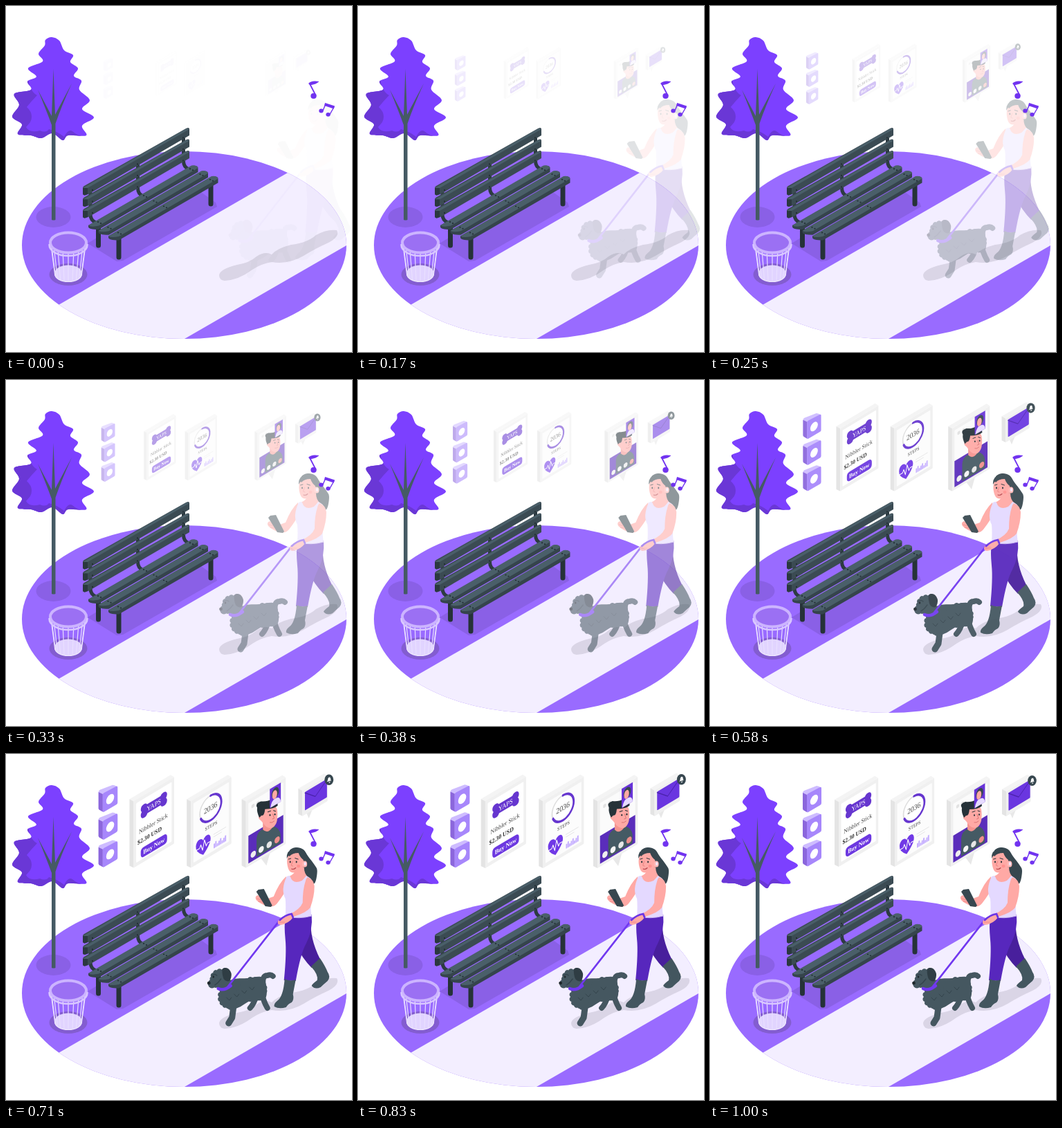
An HTML page that plays this animation: 500 px wide and 500 px high, repeating every 1.04 s.

```html
<!DOCTYPE html>
<html lang="en">
<head>
<meta charset="utf-8">
<title>Walking the dog</title>
<style>
html, body { margin: 0; width: 100%; height: 100%; overflow: hidden; background: #fff; }
svg { display: block; width: 100%; height: 100%; }
text { font-family: "Liberation Serif", "Noto Serif", serif; }
</style>
</head>
<body>
<svg id="stage" viewBox="0 0 500 500"></svg>
<script>
const stage = document.getElementById('stage');
const SKIN = '#ffa9a5', DARK = '#37474f', SLATE = '#455a64', INK = '#263238';
const VIOLET = '#7c40ff', DEEP = '#6636cf', LEASH = '#7138f0', SHADE = '#8a60e6';
const ISO = 0.577;

function add(parent, tag, attrs, text) {
  const el = document.createElementNS('http://www.w3.org/2000/svg', tag);
  for (const k in attrs) el.setAttribute(k, attrs[k]);
  if (text) el.textContent = text;
  return parent.appendChild(el);
}
const group = (parent, attrs) => add(parent, 'g', attrs);
const poly = (g, points, fill) => add(g, 'polygon', { points, fill });
const path = (g, d, fill) => add(g, 'path', { d, fill });
const line = (g, d, stroke, width) => add(g, 'path', {
  d, stroke, fill: 'none', 'stroke-width': width, 'stroke-linecap': 'round', 'stroke-linejoin': 'round' });
const oval = (g, cx, cy, rx, ry, fill) => add(g, 'ellipse', { cx, cy, rx, ry, fill });
const box = (g, x, y, width, height, rx, fill) => add(g, 'rect', { x, y, width, height, rx, fill });
const label = (g, x, y, size, fill, str, weight = 400) => add(g, 'text', {
  x, y, fill, 'font-size': size, 'font-weight': weight, 'text-anchor': 'middle' }, str);
const clipTo = (parent, id) => add(parent, 'clipPath', { id });

// Closed smooth curve through the given points
function blob(g, str, fill) {
  const p = str.split(' ').map(s => s.split(',').map(Number)), n = p.length;
  let d = 'M' + p[0];
  for (let i = 0; i < n; i++) {
    const a = p[(i + n - 1) % n], b = p[i], c = p[(i + 1) % n], e = p[(i + 2) % n];
    const ctrl = (u, v, w, s) => [0, 1].map(k => u[k] + s * (w[k] - v[k]) / 6);
    d += 'C' + ctrl(b, a, c, 1) + ' ' + ctrl(c, b, e, -1) + ' ' + c;
  }
  return path(g, d + 'Z', fill);
}

// Oval with a scalloped rim
function fur(g, cx, cy, rx, ry, tufts, fill) {
  const r = Math.PI * (rx + ry) / tufts * 0.6;
  let d = '';
  for (let i = 0; i <= tufts; i++) {
    const a = i / tufts * 2 * Math.PI;
    d += `${i ? `A${r} ${r} 0 0 1 ` : 'M'}${cx + rx * Math.cos(a)} ${cy + ry * Math.sin(a)}`;
  }
  path(g, d, fill);
}

function ground(g) {
  oval(clipTo(g, 'floor'), 257.5, 345.5, 234.5, 135.5);
  oval(g, 257.5, 345.5, 234.5, 135.5, '#996bff');
  const x0 = 0, x1 = 500, edge = (x, y, at) => `${at},${y - (at - x) * ISO}`;
  poly(group(g, { 'clip-path': 'url(#floor)' }),
    [edge(407, 241, x0), edge(407, 241, x1), edge(259, 480.4, x1), edge(259, 480.4, x0)].join(' '), '#f3eeff');
  path(g, 'M308 389Q309 380 334 374Q352 371 362 362Q374 354 384 359Q392 350 412 345Q436 342 448 331Q464 322 478 324Q483 333 466 342Q446 351 430 361Q408 374 384 370Q370 372 356 381Q336 396 316 397Q308 396 308 389Z', '#dad5e6');
}

function tree(g) {
  oval(g, 68.5, 305, 25, 15, SHADE);
  const right = '66,45 77,50 84,64 97,71 93,81 104,90 98,101 109,108 106,121 121,136 110,149 127,161 110,173 116,187';
  const left = '90,187 82,194 67,184 51,191 36,187 17,185 23,171 9,160 19,143 12,127 36,121 31,109 44,102 32,90 53,80 47,69 56,57 57,49';
  const crown = right + ' ' + left;
  blob(clipTo(g, 'crown'), crown);
  blob(g, crown, VIOLET);
  path(group(g, { 'clip-path': 'url(#crown)' }),
    'M0 106L32 107Q36 125 45 129Q38 136 30 146Q41 156 35 168L29 175Q34 184 49 180Q58 184 62 178Q74 181 84 189Q90 177 96 181Q106 190 118 188V200H0Z', '#6a37d6');
  path(g, 'M66 309V172Q58 150 46 121L66 159L68.5 91L71 157L95 112Q80 145 71.5 170V309Q68.5 310 66 309Z', SLATE);
}

function bin(g) {
  oval(g, 90, 388, 27.5, 16, '#835dd0');
  oval(g, 90, 386.5, 20, 12, '#e1d4ff');
  for (let i = 0; i <= 10; i++) {
    const u = -Math.cos(i * Math.PI / 10), v = Math.sin(i * Math.PI / 10);
    line(g, `M${90 + 25 * u} ${346 + 12 * v}L${90 + 19.5 * u} ${387 + 10 * v}`, '#e9dfff', 1.2);
  }
  line(g, 'M70.5 387A19.5 11.5 0 0 0 109.5 387', '#efe8ff', 1.2);
  add(g, 'ellipse', { cx: 90, cy: 342, rx: 26, ry: 14.5, fill: '#9b70f3', stroke: '#ccb4ff', 'stroke-width': 4 });
  line(g, 'M62.5 345A27.5 16 0 0 0 117.5 345', '#d9c7ff', 2.5);
}

function bench(g) {
  poly(g, '118,343 160,369 169,368 305,290 303,284 262,255', SHADE);
  const leg = (x, top, bottom) => line(g, `M${x} ${top}V${bottom}`, INK, 7);
  const support = (x, y, h) => line(g, `M${x} ${y}v${h}q0 9 8 12`, '#2d3b42', 5);
  support(122, 270, 31);
  support(190.5, 226, 37);
  support(256.5, 188, 36);
  for (let i = 0; i < 3; i++) {
    const s = group(g, { transform: `translate(0 ${i * 16.5})` });
    path(s, 'M111 263Q111 261 113 260L261 176.5Q265 175 265 178V187L120 271.500L114 273.500Q111 273 111 271Z', '#3b4b53');
    path(s, 'M111 263L261 177L265 178L118 263Z', '#4a5f69');
    path(s, 'M111 263H118V272L114 273.5Q111 273 111 271Z', '#2b383f');
    [125, 190, 256].forEach(x => oval(s, x, 266 - (x - 125) * ISO, 1, 1.2, '#222d33'));
  }
  leg(133.5, 318, 346);
  leg(296, 258, 286);
  leg(163, 334, 363);
  for (let i = 0; i < 3; i++) {
    const s = group(g, { transform: `translate(${i * 14.5} ${i * 7.7})` });
    path(s, 'M119 317L269 231Q278 230 277.5 235V240L134 323Q119 323 119 319Z', '#35444c');
    path(s, 'M119 317L268 230.5Q276 229.5 277.5 234L134 317.5Q123 320 119 317Z', '#4a5f69');
    [133, 199, 266].forEach(x => [0, 4].forEach(d =>
      oval(s, x + d, 312 - (x - 133) * ISO + d / 2, 1.2, 0.9, '#222d33')));
  }
}

function notes(g) {
  const ink = '#7133f0';
  oval(g, 444.5, 130, 4.2, 4, ink);
  line(g, 'M447.5 129L439 112.5', ink, 1.8);
  path(g, 'M437 112Q441 107 452.5 109Q449 113 439.5 114.5Z', ink);
  [[455.5, 151.5], [465.5, 156.8]].forEach(([x, y]) => oval(g, x, y, 3.2, 2.9, ink));
  line(g, 'M458 151L462 141.5M468 156.5L474 146', ink, 1.5);
  poly(g, '461,140 475,144.5 473.5,148.5 460,144', ink);
}

function icons(g) {
  for (let i = 0; i < 3; i++) {
    const s = group(g, { transform: `translate(0 ${i * 39})` });
    path(s, 'M134 56Q134 54 136 53L154 46Q157 46 161 49L141 84.5L135 81Q134 80 134 79Z', '#cebcff');
    path(s, 'M134 56L140 59V84L135 81Q134 80 134 79Z', '#8b66dc');
    path(s, 'M140 60Q140 58 142 57L159 48Q161 47 161 50V71Q161 73 159 74L142 84Q140 85 140 82Z', '#a787fb');
    add(s, 'circle', { r: 6.5, fill: '#fff', transform: 'matrix(.866 -.5 0 1 150.5 66)' });
  }
}

// Upright isometric panel; returns a group in the plane of its face
function panel(parent, x, y, w, h) {
  const g = group(parent, { transform: `translate(${x} ${y})` });
  const r = w * 0.866, up = -w * 0.52;
  poly(g, `-6,-3 ${r - 5},${up - 3} ${r},${up} 0,0`, '#f4f4f4');
  poly(g, `-6,-3 0,0 0,${h} -6,${h - 3}`, '#e4e4e4');
  const face = group(g, { transform: 'matrix(.866 -.52 0 1 0 0)' });
  box(face, 0, 0, w, h, 1, '#f0f0f0');
  return face;
}

function apps(g) {
  const shop = panel(g, 186, 69, 66, 94);
  box(shop, 4, 5, 58, 84, 1, '#fff');
  box(shop, 19, 15.5, 28, 13, 2, DEEP);
  [17, 49].forEach(x => [18, 26.5].forEach(y => oval(shop, x, y, 5.5, 5.5, DEEP)));
  label(shop, 33, 25.5, 9.5, '#fff', 'YAPS');
  label(shop, 32, 51, 8.8, '#444', 'Nibbler Stick');
  label(shop, 26, 65, 8.8, '#333', '$2.30 USD', 700);
  box(shop, 11.5, 73, 43, 14, 5, '#6c38e0');
  label(shop, 33, 83, 9, '#fff', 'Buy Now', 700);

  const steps = panel(g, 267, 69, 66, 94);
  box(steps, 4, 5, 58, 84, 1, '#fcfcfc');
  add(steps, 'circle', { cx: 32, cy: 26, r: 17.5, fill: '#fff', stroke: '#dedede', 'stroke-width': 2 });
  line(steps, 'M32 8.5A17.5 17.5 0 1 1 16 33', DEEP, 3.2);
  label(steps, 32, 29.5, 11, '#444', '2036');
  label(steps, 33, 54, 7, '#444', 'STEPS');
  path(steps, 'M20 86Q7 76 8 68C9 59 18 60 20 66C22 60 31 59 32 68Q33 76 20 86Z', '#7039e6');
  line(steps, 'M9 74H14L16 70L19 79L22 66L25 76L27 73H31', '#fff', 1.2);
  line(steps, 'M37 66H57M37 69.5H50', '#e2e2e2', 0.8);
  for (let i = 0; i < 8; i++) {
    const h = 6.5 + 2.5 * Math.sin(i * 2.1);
    box(steps, 37 + i * 2.6, 86 - h, 2.2, h, 0.5, '#c4adff');
  }
}

function call(g) {
  poly(g, '368,148 377,160 383,139', '#e8e8e8');
  const face = panel(g, 348, 69, 65, 94);
  box(face, 4, 5, 57, 85, 1, '#fbfbfb');
  box(face, 4, 51, 57, 39, 0, '#5a2dbb');
  [9, 17].forEach(x => box(face, x, 10, 5, 5, 2, '#e2e2e2'));

  path(g, 'M363 148V122Q364 112 372 108Q379 111 386 104Q396 106 397 116V128Z', SLATE);
  path(g, 'M372 98V109Q379 116 386 105V96Z', '#f5938f');
  blob(g, '370,84 379,78 391,78 392,96 386,106 377,105 370,97 366,92', SKIN);
  path(g, 'M367 92Q363 84 364 78Q360 72 369 69Q378 70 384 66Q393 67 393 75Q388 80 375 80Q374 90 370 89Z', INK);
  line(g, 'M379 84L383 82.5M387 82L390 83', INK, 1);
  [[382, 88.5], [389, 87.5]].forEach(([x, y]) => oval(g, x, y, 1, 1.3, INK));
  line(g, 'M386 87L388 93L385.5 94M382 99Q385 100 388 97', '#d66f70', 0.9);

  const bar = group(g, { transform: 'matrix(.866 -.52 0 1 348 69)' });
  ['#eee', '#f5f5f5', '#e6e6e6', '#ef8d8b'].forEach((c, i) => oval(bar, 12 + i * 13, 81, 4.3, 4.3, c));
  box(bar, 39, 3, 18, 27, 0, '#6834d8');
  path(bar, 'M40 30Q42 20 48 21Q56 21 57 30Z', '#e7dcff');
  oval(bar, 48, 13, 6, 7.5, DARK);
  oval(bar, 47, 15, 4, 6, SKIN);

  poly(g, '433,84 437,93 443,78', '#e8e8e8');
  const mail = panel(g, 428, 54, 41, 36);
  box(mail, 4, 4, 36, 26, 1, '#6a36e0');
  line(mail, 'M4 5L21 19L40 5', '#4a22ab', 1.1);
  oval(g, 465.5, 38.5, 6.3, 7.5, DARK);
  path(g, 'M462.5 41.5Q464 40 464 37Q465 34 467 35Q468 36 468 39L469 39.5ZM465 42L467.5 41L466 43.5Z', '#fff');
}

function woman(g) {
  const boot = '#43565f';
  // far leg, then near leg
  path(g, 'M420 266L442 240Q440 266 455 296L443 309Q430 296 420 276Z', '#481f9c');
  path(g, 'M442 307L455 295Q463 307 466 315Q471 322 466 328Q460 333 456 337Q448 341 443 335Q443 333 451 327Q453 319 442 307Z', boot);
  path(g, 'M405 234L443 232Q445 255 435 274Q427 288 420 328L403 327Q407 287 405 268Q403 248 405 234Z', '#5727bd');
  path(g, 'M404 325Q411 329 420 326L416 347Q418 355 414 359Q409 361 406 366Q396 369 389 365Q388 361 393 357Q402 351 404 325Z', boot);
  // hair behind
  blob(g, '411,140 420,135 431,138 438,148 447,160 451,169 447,187 435,183 425,171 418,150', DARK);
  // phone arm
  path(g, 'M406 177Q396 186 388 206Q381 208 376 211L365 204Q360 206 363 211Q369 217 379 220Q388 222 393 216Q404 202 408 192Z', SKIN);
  poly(g, '363,199 366,196 374,195 386,219 384,221 376,220', DARK);
  line(g, 'M364 209L370 211M366 213L372 214', '#f08c8a', 1);
  // body
  path(g, 'M410 177Q418 174 421 166L432 163Q432 173 438 178Q436 190 424 190Q413 188 410 177Z', SKIN);
  path(g, 'M407 177Q411 175 412 177Q416 189 429 183Q434 178 435 176Q443 179 444 185Q444 205 442 212Q441 224 443 234Q425 239 405 235Q406 219 405 209Q398 196 407 177Z', '#e4d9ff');
  line(g, 'M407 235Q425 239 443 234', '#c9b6f3', 1);
  // leash and hand
  line(g, 'M397 240L322 336', LEASH, 2.8);
  path(g, 'M437 178Q446 181 447 191Q447 206 441 222Q436 229 417 235Q410 245 398 247Q392 246 395 240Q402 234 410 232Q426 225 430 215Q430 196 434 184Q435 180 437 178Z', SKIN);
  line(g, 'M397 240Q404 233 414 231L416 236', '#6c35e4', 2.8);
  line(g, 'M396 243H404', '#ee8886', 0.9);
  // head
  blob(g, '408,150 413,142 424,140 432,150 430,165 422,171 412,170 408,161', SKIN);
  path(g, 'M407 151Q406 140 417 136Q431 133 436 147Q441 156 436 166Q432 163 431 153Q426 149 424 143Q415 143 411 148Q410 145 407 151Z', DARK);
  oval(g, 433, 159, 3.5, 4.5, '#ffb8b6');
  oval(g, 433.5, 158.5, 1.5, 2.5, '#f3e9ff');
  [412, 421].forEach(x => oval(g, x, 156, 1, 1.4, INK));
  line(g, 'M409.5 152L413 151M419 150.5L423.5 152', INK, 1);
  line(g, 'M415.5 155L413.5 161L416 162', '#e87d7d', 0.9);
  line(g, 'M414 166Q417 167.5 420 164.5', '#b9474e', 1.1);
  oval(g, 424, 162, 2.6, 2.2, '#ff918f');
}

function dog(g) {
  const coat = '#455760', curl = '#34444c';
  line(g, 'M373 334Q371 320 379 320Q384 318 387 321', coat, 8);
  line(g, 'M370 342Q373 357 379 367', coat, 8);
  line(g, 'M364 346Q360 361 354 367', coat, 8);
  line(g, 'M331 358L328 381L323 389', coat, 9);
  blob(g, '312,338 328,326 350,324 372,323 378,342 374,355 354,357 338,366 322,368', coat);
  fur(g, 322, 351, 13, 16, 14, coat);
  fur(g, 358, 340, 20, 16, 16, coat);
  fur(g, 311, 325, 14, 13.5, 13, coat);
  oval(g, 299, 332, 6, 6.5, coat);
  blob(g, '314,311 322,310 327,318 324,328 316,325', '#2f3d44');
  line(g, 'M299 320Q303 317 306 320M303 334Q308 331 312 325', curl, 1.4);
  for (let i = 0; i < 4; i++) line(g, `M${320 + i * 11} ${352 - i * 5}l4 4l3 -4`, curl, 1);
  oval(g, 301, 322, 1.3, 1.5, '#1f282c');
  oval(g, 294.5, 331, 2.4, 2.2, '#1f282c');
  line(g, 'M308 339Q316 343 326 335', LEASH, 4.5);
}

ground(stage);
tree(stage);
bin(stage);
bench(stage);
const zooms = [[icons, 148, 105], [apps, 252, 96.5], [call, 407, 97]].map(([draw, x, y]) => {
  const el = group(stage, {});
  draw(el);
  return { el, x, y };
});
const walkers = group(stage, {});
dog(walkers);
woman(walkers);
notes(stage);

// cubic-bezier(.36, -.01, .5, 1.38)
function ease(x) {
  const curve = (s, a, b) => 3 * s * (1 - s) ** 2 * a + 3 * s * s * (1 - s) * b + s ** 3;
  if (x >= 1) return 1;
  let lo = 0, hi = 1;
  for (let i = 0; i < 24; i++) {
    const m = (lo + hi) / 2;
    if (curve(m, 0.36, 0.5) < x) lo = m; else hi = m;
  }
  return curve(lo, -0.01, 1.38);
}

const LOOP = 1040, FPS = 24, LEAD = 0.035;

function render(ms) {
  const step = Math.max(1, Math.floor((ms % LOOP + 5) * FPS / 1000));
  const p = ease(step / FPS + LEAD), opacity = Math.min(1, Math.max(0, p));
  for (const { el, x, y } of zooms) {
    el.setAttribute('transform', `translate(${x} ${y}) scale(${0.5 + p / 2}) translate(${-x} ${-y})`);
    el.setAttribute('opacity', opacity);
  }
  walkers.setAttribute('transform', `translate(${30 * (1 - p)} 0)`);
  walkers.setAttribute('opacity', opacity);
}

const start = performance.now();
function tick() {
  render(performance.now() - start);
  requestAnimationFrame(tick);
}
tick();
</script>
</body>
</html>
```
